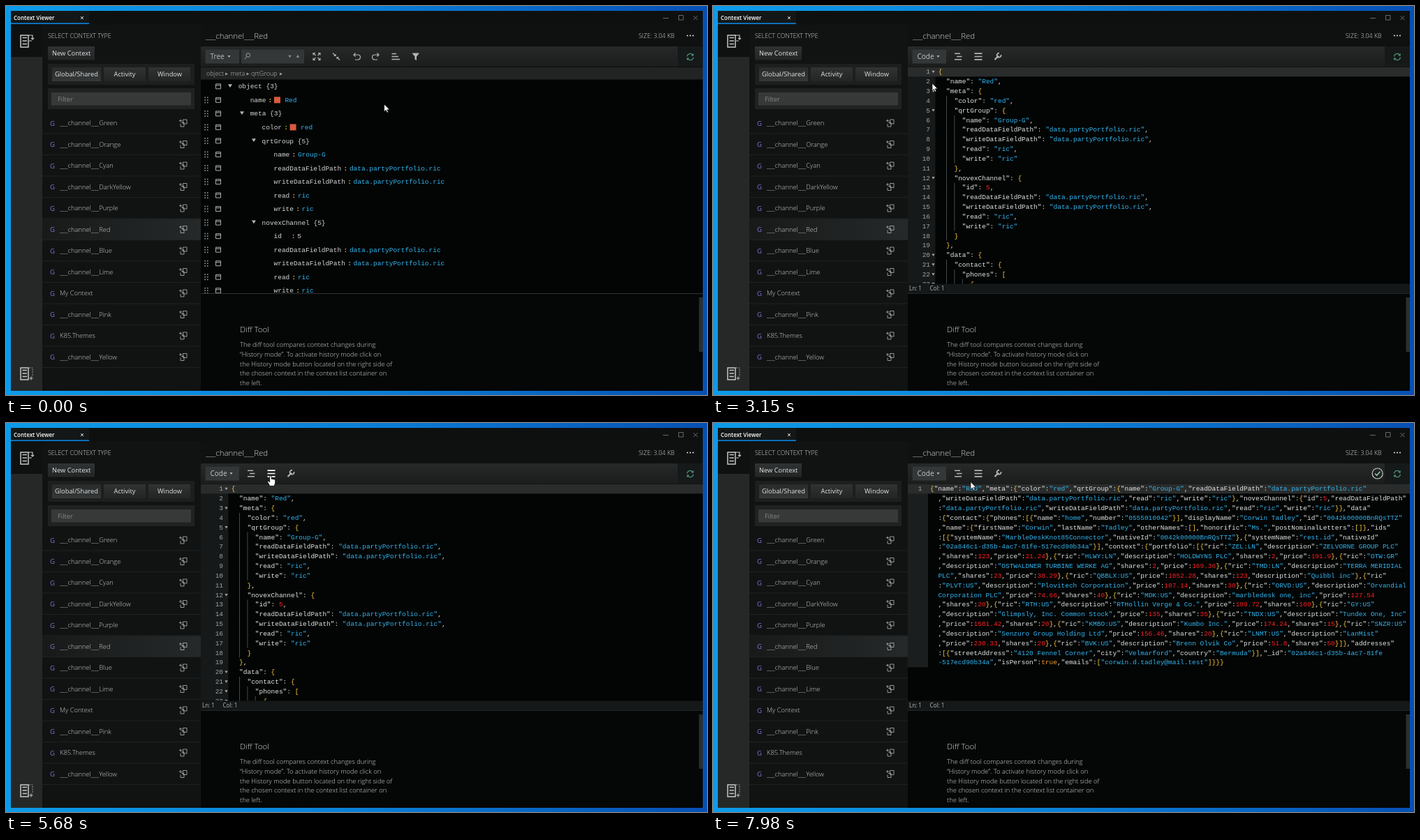
An HTML page that plays this animation: 1004x558 px, repeating every 8000 ms.

```html
<!DOCTYPE html>
<html lang="en">
<head>
<meta charset="utf-8">
<title>Context Viewer</title>
<style>
  html, body { margin: 0; width: 100%; height: 100%; overflow: hidden; background: #000; }
  svg { display: block; width: 100vw; height: 100vh; }
  text { font-family: "Open Sans", "Noto Sans", sans-serif; white-space: pre; }
  .mono { font-family: "Liberation Mono", "DejaVu Sans Mono", monospace; }
</style>
</head>
<body>
<svg id="stage" viewBox="0 0 1004 558" xmlns="http://www.w3.org/2000/svg"></svg>
<script>
const LOOP = 8000, STEP = 70;
const CYAN = '#33b5ee', YELLOW = '#f5c842', RED = '#ff2020', INK = '#d6d6d6', ICON = '#b4b6b6';
const CHAR = 5.69, MONO = 9.48, LINE = 13.83;

const COMPACT = `{"name":"Red","meta":{"color":"red","qrtGroup":{"name":"Group-G","readDataFieldPath":"data.partyPortfolio.ric"
,"writeDataFieldPath":"data.partyPortfolio.ric","read":"ric","write":"ric"},"novexChannel":{"id":5,"readDataFieldPath"
:"data.partyPortfolio.ric","writeDataFieldPath":"data.partyPortfolio.ric","read":"ric","write":"ric"}},"data"
:{"contact":{"phones":[{"name":"home","number":"0555010042"}],"displayName":"Corwin Tadley","id":"0042k00000BnRQsTTZ"
,"name":{"firstName":"Corwin","lastName":"Tadley","otherNames":[],"honorific":"Ms.","postNominalLetters":[]},"ids"
:[{"systemName":"MarbleDeskKnot85Connector","nativeId":"0042k00000BnRQsTTZ"},{"systemName":"rest.id","nativeId"
:"02a846c1-d35b-4ac7-81fe-517ecd90b34a"}],"context":{"portfolio":[{"ric":"ZEL:LN","description":"ZELVORNE GROUP PLC"
,"shares":123,"price":21.24},{"ric":"HLWY:LN","description":"HOLDWYNS PLC","shares":2,"price":191.9},{"ric":"OTW:GR"
,"description":"OSTWALDNER TURBINE WERKE AG","shares":2,"price":169.36},{"ric":"TMD:LN","description":"TERRA MERIDIAL 
PLC","shares":23,"price":38.29},{"ric":"QBBLX:US","price":1052.28,"shares":123,"description":"Quibbl inc"},{"ric"
:"PLVT:US","description":"Plovitech Corporation","price":107.14,"shares":30},{"ric":"ORVD:US","description":"Orvandial 
Corporation PLC","price":74.66,"shares":40},{"ric":"MDK:US","description":"marbledesk one, inc","price":127.54
,"shares":20},{"ric":"RTH:US","description":"RTHollin Verge & Co.","price":109.72,"shares":100},{"ric":"GY:US"
,"description":"Glimpsly, Inc. Common Stock","price":135,"shares":35},{"ric":"TNDX:US","description":"Tundex One, Inc"
,"price":1581.42,"shares":20},{"ric":"KMBO:US","description":"Kumbo Inc.","price":174.24,"shares":15},{"ric":"SNZR:US"
,"description":"Senzuro Group Holding Ltd","price":156.46,"shares":20},{"ric":"LNMT:US","description":"LanMist"
,"price":230.33,"shares":20},{"ric":"BVK:US","description":"Brenn Olvik Co","price":51.8,"shares":50}]},"addresses"
:[{"streetAddress":"4120 Fennel Corner","city":"Velmarford","country":"Bermuda"}],"_id":"02a846c1-d35b-4ac7-81fe
-517ecd90b34a","isPerson":true,"emails":["corwin.d.tadley@mail.test"]}}}`;
const PRETTY = JSON.stringify(JSON.parse(COMPACT.replace(/\n/g, '')), null, 2)
  .split('\n').slice(0, 23).join('\n');

// Markup helpers; text is placed by its vertical centre
const rect = (x, y, w, h, fill, more = '') =>
  `<rect x="${x}" y="${y}" width="${w}" height="${h}" fill="${fill}" ${more}/>`;
const line = (d, stroke = ICON, w = 1, more = '') =>
  `<path d="${d}" fill="none" stroke="${stroke}" stroke-width="${w}" ${more}/>`;
const shape = (d, fill = ICON, more = '') => `<path d="${d}" fill="${fill}" ${more}/>`;
const label = (x, cy, s, size = 9.35, fill = INK, weight = 300, more = '') =>
  `<text x="${x}" y="${cy + size * .36}" font-size="${size}" fill="${fill}" font-weight="${weight}" ${more}>${s}</text>`;
const mono = (x, cy, s, fill = INK, more = '') =>
  `<text class="mono" x="${x}" y="${cy + 3.1}" font-size="${MONO}" fill="${fill}" ${more}>${s}</text>`;
const group = (id, body, more = '') => `<g id="${id}" ${more}>${body}</g>`;
const at = (x, y, body) => `<g transform="translate(${x} ${y})">${body}</g>`;
const down = (x, y, r = 2.4, fill = ICON) => shape(`M${x - r} ${y - r * .7}h${2 * r}l${-r} ${r * 1.6}z`, fill);
const repeat = (n, f) => Array.from({ length: n }, (_, i) => f(i)).join('');

function highlight(src) {
  const token = /"[^"]*"|[{}[\]]|\d[\d.]*|true/g;
  return src.replace(token, (s, pos) => {
    const isKey = /^\n?:/.test(src.slice(pos + s.length));
    const fill = s[0] === '"' ? (isKey ? '#e4e4e4' : CYAN)
      : s === 'true' ? '#f0a030' : /\d/.test(s) ? RED : YELLOW;
    return s.replace('&', '&amp;').split('\n')
      .map(part => `<tspan fill="${fill}">${part}</tspan>`).join('\n');
  }).split('\n');
}

function frameAndRail() {
  const rail = (y, extra) => at(29, y,
    line('M-8-8H3V9H-8zM-5.5-4.5H1M-5.5 0H1M-5.5 4.5H1', '#c4c6c6', 1.5) + extra);
  return rect(0, 0, 1004, 558, 'url(#desk)') +
    rect(7, 7, 991, 545, '#0e1010') + rect(7, 7, 112, 19, '#141717') + rect(7, 24.3, 112, 1.7, '#0b7fd6') +
    label(11, 17, 'Context Viewer', 8, '#fff', 600) +
    line('M107 15l4 4m0-4l-4 4', '#ddd') +
    line('M941 17.5h8M963.5 13.5h6.5v6.5h-6.5zM984.5 14l6 6m0-6l-6 6', '#707475', .9) +
    rect(7, 27, 45, 525, '#262828') + rect(7, 27, 45, 46, '#0f1111') +
    rail(50, line('M3-8H9V-2M7-4l2 2 2-2M4 0H8', '#c4c6c6', 1.2)) +
    rail(527, line('M4-8H9V5', '#9a9c9c', 1, 'stroke-dasharray="2 1.5"') + line('M4.5 7h5M7 4.5v5', '#c4c6c6'));
}

function sidePanel() {
  const tab = (x, w, s, tx, fill) => rect(x, 88, w, 20, fill) + label(tx, 98, s, 9.3, '#e2e2e2', 400);
  const names = ['Green', 'Orange', 'Cyan', 'DarkYellow', 'Purple', 'Red', 'Blue', 'Lime', 'My Context', 'Pink', 'K85.Themes', 'Yellow'];
  const row = (name, i) => {
    const y = 168 + 30.5 * i, plain = /[ .]/.test(name);
    return (i === 5 ? rect(52, y - 15, 227, 30, 'url(#picked)') : '') +
      line(`M52 ${y + 15}H279`, '#1f2222') +
      label(63, y + .5, 'G', 9.6, '#8a6fd0', 400) +
      label(77, y, plain ? name : `___channel___${name}`, 9.35, '#cfcfcf') +
      at(253.5, y, line('M0-5H5.5V1H0zM-2.5-1H1.5V5H-3.5V1M-5.5-3.5h4M-3.5-5.5v4', '#a4a6a6', .9));
  };
  return rect(52, 27, 227, 525, '#111313') +
    label(60, 42.5, 'SELECT CONTEXT TYPE', 8.85) +
    rect(60, 58, 67, 19.5, 'url(#button)') + label(66, 67.5, 'New Context', 9.3, '#e2e2e2', 400) +
    rect(60, 83, 210, 30, '#1d1f1f') +
    tab(66, 70, 'Global/Shared', 70, 'url(#active)') + tab(140, 60, 'Activity', 154.5, 'url(#button)') +
    tab(204, 60, 'Window', 217, 'url(#button)') +
    rect(60, 118, 210, 30, '#202222') + rect(65, 124, 200, 18.5, '#373939') +
    label(74, 133.5, 'Filter', 9.3, '#858787', 400) +
    names.map(row).join('');
}

function contentFrame() {
  const help = ['The diff tool compares context changes during', '“History mode”. To activate history mode click on',
    'the History mode button located on the right side of', 'the chosen context in the context list container on', 'the left.'];
  return rect(279, 27, 719, 31, '#0f1111') +
    label(286, 42.5, '___channel___Red', 11.5) +
    label(906, 42.5, 'SIZE: 3.04 KB', 8.85) +
    repeat(3, i => `<circle cx="${976 + 4 * i}" cy="42.5" r="1.1" fill="#d0d0d0"/>`) +
    rect(279, 58, 719, 29.5, 'url(#bar)') + rect(962, 58, 36, 29.5, '#161919') +
    at(980, 73, line('M-4.5-.6A4.5 4.5 0 0 1 3.8-2.4M4.5.6A4.5 4.5 0 0 1-3.8 2.4', '#4c9c79', 1.1) +
      shape('M4.8-5v3.5H1.3zM-4.8 5V1.5H-1.3z', '#4c9c79')) +
    rect(279, 87.5, 719, 325, '#030404') + rect(279, 412, 719, 140, '#050606') +
    line('M279 412.5H998', '#303333') + rect(992.5, 418, 5.5, 78, '#2c2f2f') +
    label(335, 463.5, 'Diff Tool', 11.5) +
    help.map((s, i) => label(335, 485.5 + 13.85 * i, s)).join('');
}

const modeButton = (name, id) => rect(285.5, 62.5, 48.5, 20, '#343737') +
  label(292.5, 72.5, name, 10, '#c4c6c6', 400, `id="${id}"`) + down(id === 'treeLabel' ? 319.5 : 322.5, 72.3, 2);

function treeView() {
  const paths = [[3, 'readDataFieldPath', 'data.partyPortfolio.ric'], [3, 'writeDataFieldPath', 'data.partyPortfolio.ric'],
    [3, 'read', 'ric'], [3, 'write', 'ric']];
  const rows = [[0, 'object {3}'], [1, 'name', 'Red', true], [1, 'meta {3}'], [2, 'color', 'red', true],
    [2, 'qrtGroup {5}'], [3, 'name', 'Group-G'], ...paths, [2, 'novexChannel {5}'], [3, 'id', '5'], ...paths];
  const drawRow = ([depth, name, value, swatch], i) => {
    const y = 115.3 + 19.53 * i, x = 332.7 + 16.95 * depth;
    let out = line(`M300.5 ${y - 3.5}h7v7h-7zM300.5 ${y - 1.5}h7`, '#aaacac');
    if (i) out += repeat(6, k => rect(284.3 + 3.6 * (k % 2), y - 4.4 + 3.6 * (k >> 1), 1.7, 1.7, '#8c8e8e'));
    out += mono(x, y, name);
    if (!value) return out + down(x - 11.7, y - 1, 3);
    const colon = Math.max(x + name.length * CHAR, x + 22) + 6;
    out += mono(colon - CHAR / 2, y, ':', YELLOW, 'font-weight="700"');
    if (swatch) out += rect(colon + 5.5, y - 4.5, 9, 9, '#d9593f');
    return out + mono(colon + (swatch ? 21 : 5.6), y, value, value === '5' ? INK : CYAN);
  };
  const tools =
    at(445, 72.5, line('M-1.5-1.5L-4.5-4.5M1.5-1.5L4.5-4.5M-1.5 1.5L-4.5 4.5M1.5 1.5L4.5 4.5M-5-2V-5H-2M2-5H5V-2M5 2V5H2M-2 5H-5V2', ICON, 1.1)) +
    at(473, 72.5, line('M-5-5L-1-1M5 5L1 1M-3.5-1H-1V-3.5M3.5 1H1V3.5', ICON, 1.1)) +
    at(502, 72.5, line('M-4-2.5H2A3.2 3.2 0 0 1 2 4.5H-2M-1.5-5L-4-2.5L-1.5 0', ICON, 1.2)) +
    at(530, 72.5, line('M4-2.5H-2A3.2 3.2 0 0 0-2 4.5H2M1.5-5L4-2.5L1.5 0', ICON, 1.2)) +
    at(558, 72.5, line('M-5.5-4H1M-5.5 0H4M-5.5 4H6', ICON, 1.4)) +
    shape('M581.5 67.5h10.5l-4 5v5.5l-2.5-1.5v-4z');
  return modeButton('Tree', 'treeLabel') + rect(337, 62.5, 90, 20, '#343737') +
    line('M349.6 70.5a2.8 2.8 0 1 1-5.6 0a2.8 2.8 0 0 1 5.6 0M344.7 72.7l-3 3.5', '#a0a2a2') +
    down(406.5, 72.3, 2.3, '#8c8e8e') + shape('M415.5 73.8h4.8l-2.4-3.8z', '#8c8e8e') + tools +
    rect(279, 88, 719, 17.5, '#222424') +
    [[287, 'object', 314], [321.5, 'meta', 344.5], [351, 'qrtGroup', 392]].map(([x, s, ax]) =>
      label(x, 97, s, 9, '#bcbebe') + shape(`M${ax} 95.5l4 2-4 2z`, '#9c9e9e')).join('') +
    group('rows', rows.map(drawRow).join(''), 'clip-path="url(#treeClip)"') +
    group('menu', rect(285.5, 83, 91, 36.5, '#303333') +
      label(303, 93.5, 'Tree', 10, '#c4c6c6', 400, 'id="itemTree"') +
      label(303, 111, 'Code', 10, '#c4c6c6', 400, 'id="itemCode"'));
}

const codeFrame = () => modeButton('Code', 'codeLabel') +
  at(351, 72.5, line('M-5-4.3H3M-2 0H5.5M-5 4.3H5', ICON, 1.5)) +
  group('compactIcon', at(380, 72.5, line('M-5.5-4.3H5.5M-5.5 0H5.5M-5.5 4.3H5.5', 'currentColor', 1.7))) +
  at(408, 72.5, line('M-4.5 4.5L1-1', ICON, 2.2) + line('M4.5-2.5A3 3 0 1 1 2-4.8', ICON, 1.8)) +
  rect(279, 398.5, 719, 14, '#151818') +
  label(281, 405.3, 'Ln: 1', 8.03, '#b8baba', 400) + label(310.5, 405.3, 'Col: 1', 8.03, '#b8baba', 400);

const lineNumber = (x, y, n) => mono(x, y, n, '#a2a4a4', 'text-anchor="end"');

function prettyView() {
  const raw = PRETTY.split('\n');
  const body = highlight(PRETTY).map((markup, i) => {
    const y = 94.3 + LINE * i, depth = raw[i].search(/\S/) / 2;
    return lineNumber(311, y, i + 1) +
      (/[{[]$/.test(raw[i]) ? down(315.5, y, 2.2, '#a2a4a4') : '') +
      repeat(Math.max(0, depth - 1), k => line(`M${334.5 + 11.38 * k} ${y - 6.9}v${LINE}`, '#4e5151', .9)) +
      mono(322.7 + depth * 2 * CHAR, y, markup.trimStart());
  }).join('');
  return rect(279, 87.5, 39.5, 311, '#161919') + rect(279, 87.5, 719, 13.8, '#2a2c2c') + body;
}

const compactView = () =>
  rect(279, 87.5, 29, 262.8, '#1b1e1e') + rect(279, 87.5, 719, 13.8, '#2a2c2c') + lineNumber(299.5, 94.3, 1) +
  highlight(COMPACT).map((markup, i) => mono(i ? 322.4 : 311, 94.3 + LINE * i, markup)).join('');

const checkMark = () => at(951.7, 72.5,
  '<circle r="7.5" fill="none" stroke="#c3cec9" stroke-width="1.2"/>' + line('M-3.5 0L-1 2.7L3.7-2.8', '#8fd0b0', 1.5));

const gradient = (id, stops, vertical = true) =>
  `<linearGradient id="${id}" x1="0" y1="0" x2="${vertical ? 0 : 1}" y2="${vertical ? 1 : 0}">` +
  stops.map((c, i) => `<stop offset="${i / (stops.length - 1)}" stop-color="${c}"/>`).join('') + '</linearGradient>';
const clip = (id, y, h) => `<clipPath id="${id}">${rect(279, y, 719, h, '#000')}</clipPath>`;

const stage = document.getElementById('stage');
stage.innerHTML = '<defs>' +
  gradient('desk', ['#0c9bea', '#0a80d8', '#0650b4'], false) + gradient('button', ['#303333', '#232525']) +
  gradient('active', ['#292b2b', '#353838']) + gradient('bar', ['#272929', '#1b1d1d']) +
  gradient('picked', ['#181a1a', '#262929'], false) + clip('treeClip', 105.5, 306.5) + clip('codeClip', 87.5, 311) + '</defs>' +
  frameAndRail() + sidePanel() + contentFrame() + group('tree', treeView()) +
  group('code', group('pretty', prettyView(), 'clip-path="url(#codeClip)"') +
    group('compact', compactView() + checkMark()) + codeFrame()) +
  group('pointer',
    group('arrow', shape('M0 0V10.6L2.5 8.3 4.1 12 5.8 11.3 4.2 7.7H7.6Z', '#fff', 'stroke="#000" stroke-width=".6"')) +
    group('hand', shape('M-1.3.8Q0-.8 1.3.8V5q1.2-.8 2 .2 1.2-.6 1.8.4 1.5-.4 1.6 1V10q0 2-1.2 3V14.8H-2V13L-4.3 9.3q-.6-1.6.9-1.5L-1.3 9.3Z', '#fff', 'stroke="#000" stroke-width=".8"')) +
    group('beam', line('M-2.5-5.8Q0-5.8 0-4.5Q0-5.8 2.5-5.8M0-4.5V4.5M-2.5 5.8Q0 5.8 0 4.5Q0 5.8 2.5 5.8', '#c8c8c8', .9)));

const el = id => document.getElementById(id);
const show = (id, on) => el(id).setAttribute('display', on ? 'inline' : 'none');
const bright = (id, on) => el(id).setAttribute('fill', on ? '#fff' : '#b8baba');

// Pointer strokes: start time, number of steps, end point
const START = [541.7, 141];
const STROKES = [
  [380, 12, 336.5, 80.5], [1210, 1, 328, 77], [1280, 2, 323, 74.5], [2130, 3, 314, 87], [2400, 3, 338, 99],
  [2610, 4, 314, 111], [3750, 8, 463, 169], [4370, 3, 451, 160], [4580, 11, 374.5, 82], [5400, 5, 379, 75.5],
  [6080, 6, 407, 147], [7490, 8, 369, 84.5]
];

function pointerAt(t) {
  let [x, y] = START;
  for (const [begin, steps, endX, endY] of STROKES) {
    if (t < begin) break;
    const k = Math.min(steps, Math.floor((t - begin) / STEP) + 1) / steps;
    const ease = k * k * (3 - 2 * k);
    x += (endX - x) * ease;
    y += (endY - y) * ease;
  }
  return [x, y];
}

function render(t) {
  const [x, y] = pointerAt(t);
  const inCode = t >= 3150, isCompact = t >= 5880, menuOpen = t >= 1610 && !inCode;
  const overIcon = inCode && Math.abs(x - 379.5) < 8 && Math.abs(y - 72) < 8;
  const kind = (t >= 1210 && !inCode) || overIcon ? 'hand' : inCode && x > 320 && y > 88 ? 'beam' : 'arrow';
  show('tree', !inCode);
  show('code', inCode);
  show('pretty', !isCompact);
  show('compact', isCompact);
  show('menu', menuOpen);
  bright('treeLabel', t >= 1210 && !menuOpen);
  bright('itemTree', y >= 84 && y < 102);
  bright('itemCode', y >= 102);
  el('compactIcon').setAttribute('color', overIcon ? '#fff' : ICON);
  for (const k of ['arrow', 'hand', 'beam']) show(k, k === kind);
  el('pointer').setAttribute('transform', `translate(${x} ${y})`);
}

function tick() {
  render(performance.now() % LOOP);
  requestAnimationFrame(tick);
}
tick();
</script>
</body>
</html>
```
